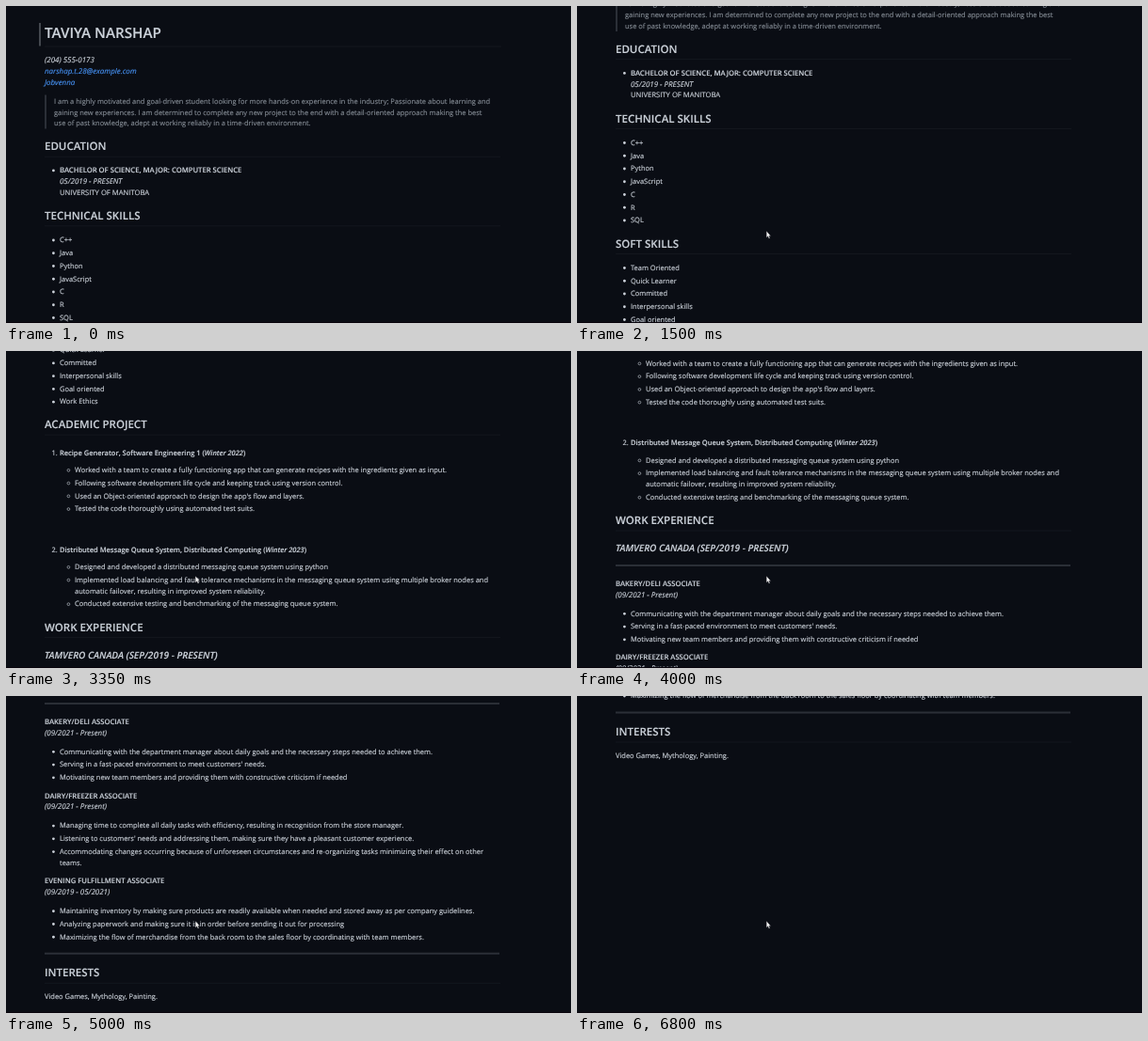
Animation of 600x337 px, one loop 6.85 s. Source, as an HTML page:

```html
<!DOCTYPE html>
<html lang="en">
<head>
<meta charset="utf-8">
<title>Resume preview</title>
<style>
  html, body { margin: 0; width: 100%; height: 100%; overflow: hidden; background: #0a0d14; }
  svg { display: block; width: 100%; height: 100%; --ink: #ccd2da; }
  text {
    font: 7.48px "Open Sans", "Noto Sans", sans-serif;
    fill: var(--ink);
    stroke: var(--ink);
    stroke-width: .14;
    text-rendering: geometricPrecision;
    white-space: pre;
  }
  .h1 { font-size: 15.2px; font-weight: 600; }
  .h2 { font-size: 11.5px; font-weight: 600; }
  .h3 { font-size: 10.1px; font-weight: 600; font-style: italic; }
  .strong { font-weight: 600; }
  .caps { font-size: 7.66px; }
  .em, .link { font-size: 7.95px; font-style: italic; }
  .term { font-style: italic; }
  .link { --ink: #4691f2; }
  .quote { --ink: #838a93; }
  .disc { fill: var(--ink); }
  .ring { fill: none; stroke: var(--ink); stroke-width: .6; }
  .rule { fill: #171b22; }
  .bar { fill: #2b2f37; }
  .active { fill: #6c7077; }
</style>
</head>
<body>
<svg viewBox="0 0 600 337">
  <g id="page"></g>
  <rect y="336" width="600" height="1" fill="#08040c"/>
  <path id="pointer" d="M201.2 239.2v7l1.5-1.4 1.1 2.4 1.1-.5-1.1-2.3h2z"
        fill="#f4f4f4" stroke="#15171c" stroke-width=".3"/>
</svg>
<script>
  const LEFT = 41, WRAP = 11.85, ITEM = 13.75;

  const rect = (cls, x, y, w, h) =>
    `<rect class="${cls}" x="${x}" y="${y}" width="${w}" height="${h}"/>`;
  const line = (cls, x, y, str, drop = 2.7) =>
    `<text class="${cls}" x="${x}" y="${y + drop}">${str}</text>`;

  // Every y is the middle of the capitals of the first line.
  const lines = (cls, x, y, ...rows) =>
    rows.map((row, i) => line(cls, x, y + i * WRAP, row)).join("");
  const h2 = (y, str) => line("h2", LEFT, y, str, 3.8) + rect("rule", LEFT, y + 10.3, 484, .7);
  const hr = y => rect("bar", LEFT, y - 1, 483, 2);
  const role = (y, name, dates) =>
    line("strong caps", LEFT, y, name) + line("em", LEFT, y + WRAP, dates);

  // An item may be an array of wrapped rows.
  const list = (x, mark, y, ...items) => items.map(item => {
    const rows = [].concat(item), top = y;
    y += ITEM + (rows.length - 1) * WRAP;
    return `<circle class="${mark}" cx="${x - 6.6}" cy="${top + .4}" r="1.4"/>` +
      lines("", x, top, ...rows);
  }).join("");
  const bullets = (y, ...items) => list(57, "disc", y, ...items);
  const nested = (y, ...items) => list(73, "ring", y, ...items);
  const numbered = (y, n, name, term) =>
    line("", 48.6, y, n + ".") +
    line("strong", 57, y, `${name} (<tspan class="term">${term}</tspan>)`);

  const page = document.getElementById("page");
  const pointer = document.getElementById("pointer");

  page.innerHTML = [
    rect("active", 35.4, 18, 1.2, 24.5),
    line("h1", LEFT, 29, "TAVIYA NARSHAP", 5.2),
    rect("rule", LEFT, 42.7, 485, .7),
    line("em", LEFT, 57.5, "(204) 555-0173"),
    lines("link", LEFT, 69.3, "narshap.t.28@example.com", "Jobvenna"),
    rect("bar", LEFT, 94.5, 2, 36),
    lines("quote", 51, 101,
      "I am a highly motivated and goal-driven student looking for more hands-on experience in the industry; Passionate about learning and",
      "gaining new experiences. I am determined to complete any new project to the end with a detail-oriented approach making the best",
      "use of past knowledge, adept at working reliably in a time-driven environment."),

    h2(149.5, "EDUCATION"),
    bullets(174.5, ""),
    line("strong caps", 57, 174.5, "BACHELOR OF SCIENCE, MAJOR: COMPUTER SCIENCE"),
    line("em", 57, 186.3, "05/2019 - PRESENT"),
    line("caps", 57, 198.1, "UNIVERSITY OF MANITOBA"),

    h2(223.2, "TECHNICAL SKILLS"),
    bullets(248.6, "C++", "Java", "Python", "JavaScript", "C", "R", "SQL"),

    h2(356.2, "SOFT SKILLS"),
    bullets(381.6, "Team Oriented", "Quick Learner", "Committed",
      "Interpersonal skills", "Goal oriented", "Work Ethics"),

    h2(475, "ACADEMIC PROJECT"),
    numbered(504.5, 1, "Recipe Generator, Software Engineering 1", "Winter 2022"),
    nested(523,
      "Worked with a team to create a fully functioning app that can generate recipes with the ingredients given as input.",
      "Following software development life cycle and keeping track using version control.",
      "Used an Object-oriented approach to design the app's flow and layers.",
      "Tested the code thoroughly using automated test suits."),
    numbered(607.6, 2, "Distributed Message Queue System, Distributed Computing", "Winter 2023"),
    nested(626,
      "Designed and developed a distributed messaging queue system using python",
      ["Implemented load balancing and fault tolerance mechanisms in the messaging queue system using multiple broker nodes and",
       "automatic failover, resulting in improved system reliability."],
      "Conducted extensive testing and benchmarking of the messaging queue system."),

    h2(690.4, "WORK EXPERIENCE"),
    line("h3", LEFT, 719.7, "TAMVERO CANADA (SEP/2019 - PRESENT)", 3.5),
    hr(738),
    role(757.2, "BAKERY/DELI ASSOCIATE", "(09/2021 - Present)"),
    bullets(788.9,
      "Communicating with the department manager about daily goals and the necessary steps needed to achieve them.",
      "Serving in a fast-paced environment to meet customers' needs.",
      "Motivating new team members and providing them with constructive criticism if needed"),
    role(835.8, "DAIRY/FREEZER ASSOCIATE", "(09/2021 - Present)"),
    bullets(867.6,
      "Managing time to complete all daily tasks with efficiency, resulting in recognition from the store manager.",
      "Listening to customers' needs and addressing them, making sure they have a pleasant customer experience.",
      ["Accommodating changes occurring because of unforeseen circumstances and re-organizing tasks minimizing their effect on other",
       "teams."]),
    role(926.7, "EVENING FULFILLMENT ASSOCIATE", "(09/2019 - 05/2021)"),
    bullets(958.3,
      "Maintaining inventory by making sure products are readily available when needed and stored away as per company guidelines.",
      "Analyzing paperwork and making sure it is in order before sending it out for processing",
      "Maximizing the flow of merchandise from the back room to the sales floor by coordinating with team members."),
    hr(1003.7),

    h2(1024.5, "INTERESTS"),
    line("", LEFT, 1049.5, "Video Games, Mythology, Painting.")
  ].join("");

  const LOOP = 6850, STEP = 50, POINTER_AT = 250;

  // Wheel gestures: [start ms, scroll position they lead to].
  const gestures = [
    [380, 103.1], [1495, 281], [2430, 393.2], [3330, 506.6],
    [3980, 626.3], [4830, 783], [5578, 911], [6380, 988]
  ];

  // Critically damped approach from 0 to 1.
  const settle = ms => {
    const a = Math.max(0, ms) / 75;
    return 1 - (1 + a) * Math.exp(-a);
  };
  const scrollAt = t => gestures.reduce((sum, [start, to], i) =>
    sum + (to - (i ? gestures[i - 1][1] : 0)) * settle(t - start), 0);

  function draw() {
    const t = Math.floor(performance.now() % LOOP / STEP) * STEP;
    page.setAttribute("transform", `translate(0 ${-scrollAt(t).toFixed(2)})`);
    pointer.setAttribute("visibility", t < POINTER_AT ? "hidden" : "visible");
    requestAnimationFrame(draw);
  }
  draw();
</script>
</body>
</html>
```
